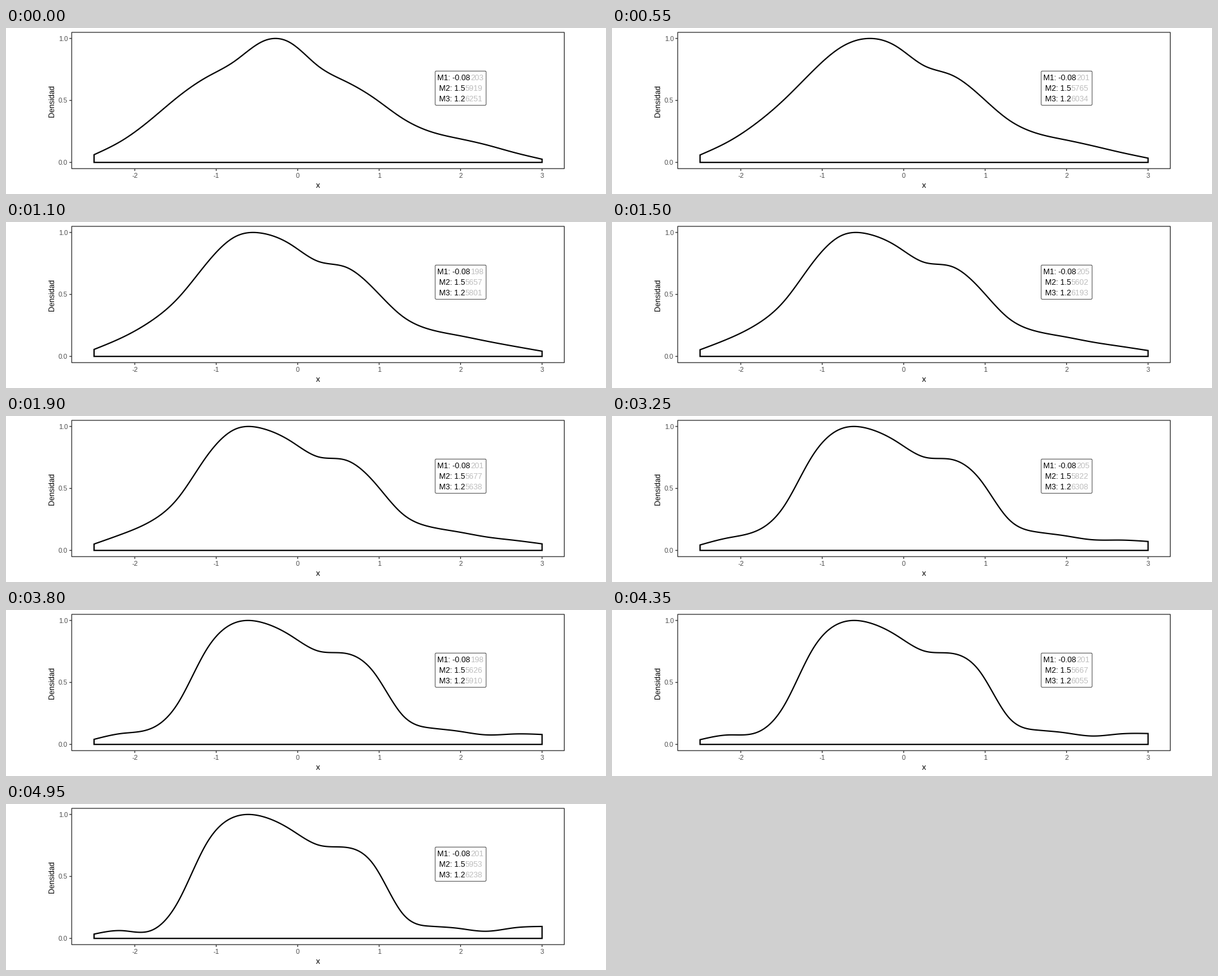
A matplotlib script for the animation above (5 s loop, 960 px wide and 267 px high).

```python
import numpy as np
import matplotlib.pyplot as plt
from matplotlib.animation import FuncAnimation
from matplotlib.patches import FancyBboxPatch, Rectangle

W, H, DPI = 960, 267, 72  # at 72 dpi one point is one pixel
FRAMES, INTERVAL = 100, 50
X0, X_UNIT = 466.7, 130.33
Y0, Y_UNIT = 216.2, 199.4
LEFT, RIGHT, TOP, BOTTOM = 105.1, 893.3, 7.0, 226.2

plt.rcParams["font.family"] = "Liberation Sans"

# Density at even steps of x, first and last
START = np.array([.062, .176, .34, .528, .683, .811, .971, .964, .776,
                  .65, .518, .357, .249, .193, .142, .08, .026])
END = np.array([.035, .063, .061, .297, .763, .984, .989, .886, .758,
                .738, .593, .207, .099, .082, .058, .086, .097])
KNOTS = np.linspace(-2.5, 3, len(START))
GRID = np.linspace(-2.5, 3, 400)

# The middle settles early, the flanks and tails drift steadily
HASTE = 1 + 6 * np.exp(-(KNOTS + 0.25) ** 6)


def spline_matrix(knots, x):
    """Matrix taking values at the knots to a natural cubic spline at x."""
    n = len(knots)

    def basis(u):
        return np.c_[np.abs(u[:, None] - knots) ** 3, np.ones_like(u), u]

    system = np.zeros((n + 2, n + 2))
    system[:n] = basis(knots)
    system[n:, :n] = system[:n, n:].T
    return basis(x) @ np.linalg.inv(system)[:, :n]


SPLINE = spline_matrix(KNOTS, GRID)


def density(progress):
    ease = 1 - (1 - progress) ** HASTE
    curve = SPLINE @ (START + (END - START) * ease)
    return curve / curve.max()


fig = plt.figure(figsize=(W / DPI, H / DPI), dpi=DPI, facecolor="white")
ax = fig.add_axes([0, 0, 1, 1])
ax.set_xlim(0, W)
ax.set_ylim(H, 0)
ax.axis("off")


def label(x, y, text, size, color="black", ha="center", **kw):
    return ax.text(x, y, text, fontsize=size, color=color, ha=ha,
                   va="baseline", zorder=5, **kw)


def tick(xs, ys):
    ax.plot(xs, ys, color="#333333", lw=1.3, solid_capstyle="butt", snap=False)


ax.add_patch(Rectangle((LEFT, TOP), RIGHT - LEFT, BOTTOM - TOP,
                       fill=False, ec="#333333", lw=1.3, snap=False))
for value in range(-2, 4):
    x = X0 + value * X_UNIT
    tick([x, x], [BOTTOM, BOTTOM + 3.7])
    label(x, 241, str(value), 10.8, "#4d4d4d")
for value in (0, 0.5, 1):
    y = Y0 - value * Y_UNIT
    tick([LEFT - 3.7, LEFT], [y, y])
    label(98.8, y + 4, f"{value:.1f}", 10.8, "#4d4d4d", "right")
label(499.3, 257, "x", 13)
label(77, 116.8, "Densidad", 12.1, rotation=90, rotation_mode="anchor")

ax.add_patch(FancyBboxPatch((686.8, 69.2), 81.3, 55, fc="white", ec="black",
                            lw=0.7, boxstyle="round,pad=0,rounding_size=1.5",
                            zorder=4, snap=False))

# Each moment keeps its leading digits while the grey tail flickers
rng = np.random.default_rng(4)
tails = []
for row, (head, split, low, high) in enumerate([
        ("M1: -0.08", 743, 198, 206),
        ("M2: 1.5", 734.3, 5600, 6200),
        ("M3: 1.2", 734.3, 5600, 6450)]):
    base = 83.8 + 17 * row
    label(split, base, head, 12.5, ha="right")
    tail = label(split, base, "", 12.5, "#bebebe", "left")
    tails.append((tail, rng.integers(low, high, FRAMES)))

curve_x = X0 + X_UNIT * GRID
outline_x = np.r_[curve_x[0], curve_x, curve_x[-1]]
outline = ax.fill(curve_x, curve_x, fill=False, ec="black", lw=2.1,
                  joinstyle="miter", zorder=3)[0]


def update(frame):
    height = np.r_[0, density(frame / (FRAMES - 1)), 0]
    outline.set_xy(np.c_[outline_x, Y0 - Y_UNIT * height])
    for tail, digits in tails:
        tail.set_text(str(digits[frame]))
    return [outline, *(tail for tail, _ in tails)]


anim = FuncAnimation(fig, update, frames=FRAMES, interval=INTERVAL,
                     init_func=lambda: update(0), repeat=True, repeat_delay=0)
plt.show()
```
